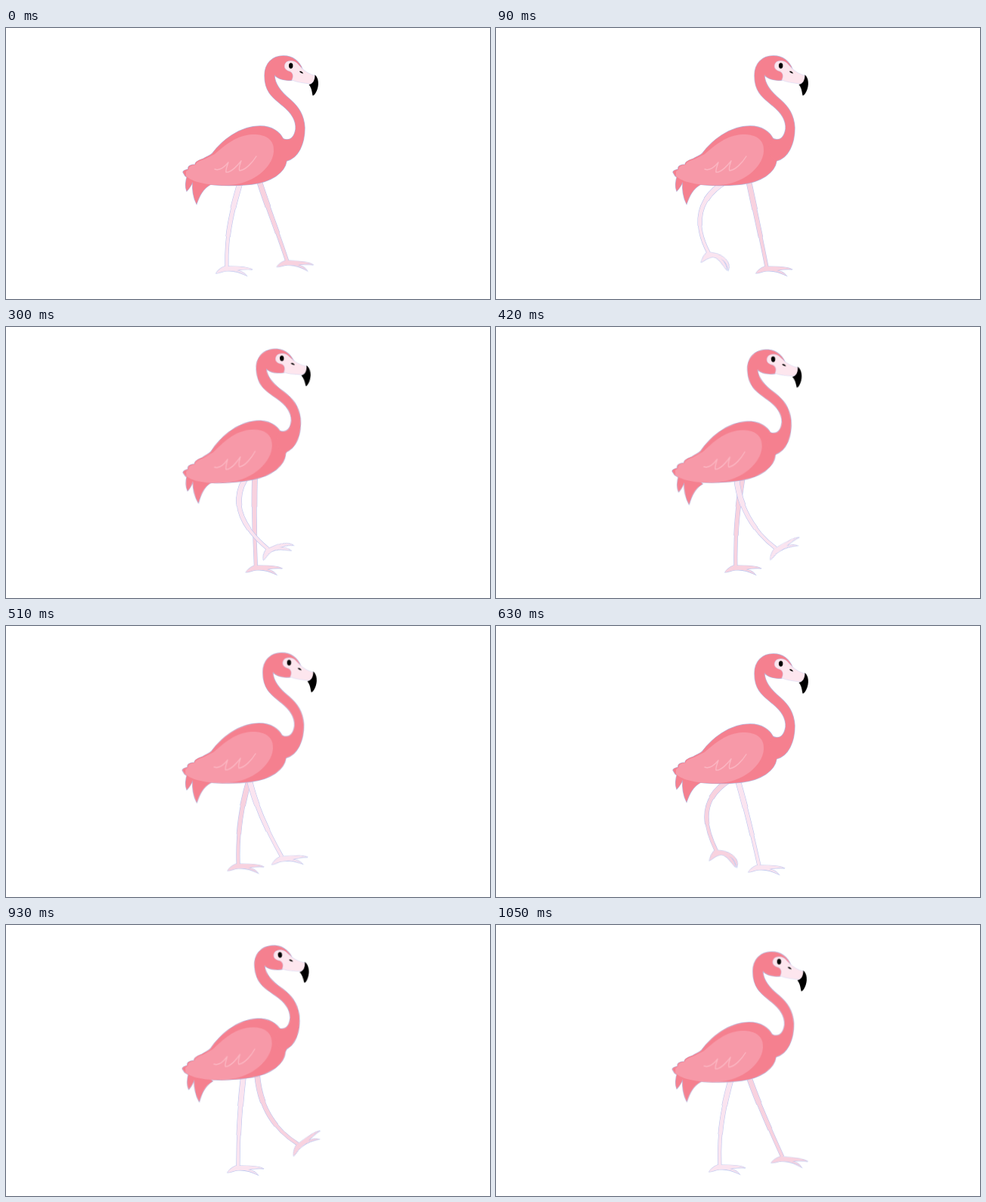
An HTML page without scripts for the animation above (1080 ms loop, 640 by 359 pixels).

```html
<!DOCTYPE html>
<html lang="en">
<head>
<meta charset="utf-8">
<title>Walking flamingo</title>
<style>
html, body { margin: 0; width: 100%; height: 100%; overflow: hidden; background: #fff; }
svg { display: block; width: 100%; height: 100%; }

.bird {
  --edge: #bcc6ee;
  --flat: path("M-3 0 C-8 2 -13 6 -14 9 C-9 9 -6 6 0 6 C10 5 18 8 26 12 C24 9 19 6 13 5 C20 4 28 3 34 4 C28 0 14 0 3 0Z");
  --curl: path("M-2 -1 C-6 4 -7 10 -7 14 C-4 12 0 6 7 4 C15 3 22 13 28 17 C27 12 22 6 17 4 C25 6 28 12 30 17 C32 8 22 -3 2 -1Z");
}

/* legs: three dashed strokes make the taper */
.far { --skin: #f8d2df; --walk: far-leg; --step: far-foot; }
.near { --skin: #fae4f0; --walk: near-leg; --step: near-foot; }
.leg path {
  fill: none; stroke: var(--skin); stroke-width: var(--w);
  animation: var(--walk) 1.08s linear infinite;
}
.leg.edge path { stroke: var(--edge); stroke-width: calc(var(--w) + 1.2px); }
.w1 { --w: 4px; }
.w2 { --w: 5.2px; stroke-dasharray: 6.6 20; }
.w3 { --w: 6.5px; stroke-dasharray: 3.4 20; }
.foot {
  d: var(--flat); fill: var(--skin);
  stroke: var(--edge); stroke-width: 1.2px; paint-order: stroke;
  animation: var(--step) 1.08s linear infinite;
}

.body { transform-origin: 310px 170px; animation: bob .54s linear infinite; }
.neck { transform-origin: 375px 165px; animation: reach .54s linear infinite; }
.tail { animation: sway .54s linear infinite; }
.pink { fill: #f5808f; }
.rim { fill: none; stroke: #b3b5dc; stroke-width: 1.3px; }

@keyframes bob {
  0%, 16.7%, 100% { transform: translate(0, 0) rotate(0deg); }
  33.3% { transform: translate(-1.2px, -2.5px) rotate(-5.2deg); }
  40% { transform: translate(-1.2px, -3px) rotate(-5.4deg); }
  72.2% { transform: translate(-2px, -4.5px) rotate(-3deg); }
  77.8% { transform: translate(-2px, -3.5px) rotate(-2.7deg); }
  94.4% { transform: translate(-1px, -.7px) rotate(-.7deg); }
}
@keyframes reach {
  0%, 16.7%, 94.4%, 100% { transform: translate(0, 0) rotate(0deg) scale(1, 1); }
  33.3%, 40% { transform: translate(0, 0) rotate(1.6deg) scale(1, .98); }
  72.2% { transform: translate(-2px, -3px) rotate(-2deg) scale(1, 1); }
  77.8% { transform: translate(-.5px, -1px) rotate(-1deg) scale(1, 1); }
}
@keyframes sway {
  0%, 16.7%, 100% { transform: translate(0, 0); }
  36% { transform: translate(-4px, -4px); }
  75% { transform: translate(2.5px, 3px); }
}

@keyframes near-leg {
  0%, 100% { d: path("M311 200 C303 230 291 264 292 317"); }
  8.33% { d: path("M306 202 C264 226 262 262 281 298"); }
  16.67% { d: path("M310 202 C258 228 264 265 300 297"); }
  23.6% { d: path("M314 202 C283 232 290 262 333 294"); }
  30.6% { d: path("M317 202 C308 232 324 266 355 294"); }
  38.9% { d: path("M318 200 C321 232 336 268 370 293"); }
  44.4% { d: path("M321 200 C326 235 342 268 370 302"); }
  50% { d: path("M321 200 C331 235 347 272 360 309"); }
  58.33% { d: path("M319 202 C328 232 338 272 348 317"); }
  69.44% { d: path("M318 200 C321 235 325 275 328 318"); }
  86.1% { d: path("M314 200 C310 235 307 275 307 319"); }
  97.2% { d: path("M312 200 C303 232 294 268 296 318"); }
}
@keyframes near-foot {
  0%, 100% { d: var(--flat); transform: translate(292px, 316px) rotate(0deg); }
  8.33% { d: var(--curl); transform: translate(281px, 298px) rotate(12deg); }
  16.67% { d: var(--curl); transform: translate(300px, 297px) rotate(0deg); }
  23.6% { d: var(--curl); transform: translate(333px, 294px) rotate(-20deg); }
  30.6% { d: var(--flat); transform: translate(355px, 294px) rotate(-26deg); }
  38.9% { d: var(--flat); transform: translate(370px, 293px) rotate(-32deg); }
  44.4% { d: var(--flat); transform: translate(370px, 302px) rotate(-14deg); }
  50% { d: var(--flat); transform: translate(360px, 309px) rotate(2deg); }
  58.33% { d: var(--flat); transform: translate(348px, 317px) rotate(0deg); }
  69.44% { d: var(--flat); transform: translate(329px, 318px) rotate(0deg); }
  86.1% { d: var(--flat); transform: translate(307px, 319px) rotate(0deg); }
  97.2% { d: var(--flat); transform: translate(296px, 318px) rotate(0deg); }
}
@keyframes far-leg {
  0%, 100% { d: path("M334 200 C344 232 360 272 372 309"); }
  8.33% { d: path("M334 202 C341 235 350 275 358 316"); }
  16.67% { d: path("M332 198 C336 235 341 275 344 317"); }
  38.9% { d: path("M326 198 C320 235 316 275 317 317"); }
  50% { d: path("M322 200 C310 232 302 268 304 316"); }
  58.33% { d: path("M312 202 C268 228 274 262 291 298"); }
  69.44% { d: path("M319 202 C288 232 292 262 338 293"); }
  77.8% { d: path("M327 202 C314 232 330 270 367 292"); }
  86.1% { d: path("M332 198 C335 235 350 268 386 290"); }
  91.7% { d: path("M333 198 C339 234 356 268 385 299"); }
  97.2% { d: path("M334 200 C345 232 362 270 379 307"); }
}
@keyframes far-foot {
  0%, 100% { d: var(--flat); transform: translate(373px, 308px) rotate(3deg); }
  8.33% { d: var(--flat); transform: translate(358px, 316px) rotate(0deg); }
  16.67% { d: var(--flat); transform: translate(346px, 316px) rotate(0deg); }
  38.9% { d: var(--flat); transform: translate(317px, 316px) rotate(0deg); }
  50% { d: var(--flat); transform: translate(304px, 315px) rotate(0deg); }
  58.33% { d: var(--curl); transform: translate(291px, 298px) rotate(9deg); }
  69.44% { d: var(--curl); transform: translate(339px, 292px) rotate(-18deg); }
  77.8% { d: var(--flat); transform: translate(367px, 292px) rotate(-29deg); }
  86.1% { d: var(--flat); transform: translate(386px, 290px) rotate(-38deg); }
  91.7% { d: var(--flat); transform: translate(385px, 299px) rotate(-15deg); }
  97.2% { d: var(--flat); transform: translate(379px, 307px) rotate(4deg); }
}
</style>
</head>
<body>
<svg viewBox="0 0 640 359" preserveAspectRatio="none">
  <defs>
    <path id="torso" d="M234 191C235 188 238 188 241 187C240 183 244 181 250 181C250 177 255 175 261 173C266 170 270 169 273 166C285 150 308 130 336 130C352 130 362 138 366 146C372 152 378 165 371 176C369 192 350 204 325 207C295 210 255 210 237 196Z"/>
    <path id="swan" d="M342 63C342 85 353 92 366 103C377 112 384 122 383 134C381 145 376 150 367 147C360 152 358 172 371 176C387 172 395 153 395 132C394 115 387 105 376 95C365 86 355 75 355 62C360 68 370 70 378 69L392 55C388 44 379 37 367 37C352 37 342 47 342 63Z"/>
    <path id="plume" d="M240 195C237 204 237 211 239 216C243 212 245 208 247 204C246 214 248 225 252 233C256 222 260 213 271 207L262 198Z"/>
  </defs>
  <g class="bird">
    <g class="far">
      <g class="leg edge"><path class="w1" pathLength="10"/><path class="w2" pathLength="10"/><path class="w3" pathLength="10"/></g>
      <path class="foot"/>
      <g class="leg"><path class="w1" pathLength="10"/><path class="w2" pathLength="10"/><path class="w3" pathLength="10"/></g>
    </g>
    <g class="near">
      <g class="leg edge"><path class="w1" pathLength="10"/><path class="w2" pathLength="10"/><path class="w3" pathLength="10"/></g>
      <path class="foot"/>
      <g class="leg"><path class="w1" pathLength="10"/><path class="w2" pathLength="10"/><path class="w3" pathLength="10"/></g>
    </g>
    <g class="body">
      <g class="rim">
        <use class="tail" href="#plume"/>
        <use href="#torso"/>
        <use class="neck" href="#swan"/>
      </g>
      <g class="pink">
        <use class="tail" href="#plume"/>
        <use href="#torso"/>
      </g>
      <path fill="#f799a8" d="M238 190L242 187C241 184 245 182 251 181C251 178 256 176 262 174L276 167C290 155 305 142 326 141C346 141 355 149 354 164C352 186 325 207 295 208C270 209 247 205 238 196Z"/>
      <path fill="none" stroke="#fbb5c1" stroke-width="1.4" stroke-linecap="round" stroke-linejoin="round" d="M276 187C283 190 289 184 294 178C292 184 290 189 291 191C298 192 306 182 311 176C309 182 307 187 309 189C317 188 326 178 331 170"/>
      <g class="neck">
        <use class="pink" href="#swan"/>
        <path fill="#fde6ee" stroke="#ccd2f2" stroke-width=".5" d="M370 46C374 42 383 43 387 49C393 56 402 62 409 63C410 69 408 72 402 74C394 73 385 72 378 69C381 63 379 58 374 57C368 55 367 50 370 46Z"/>
        <path d="M408.5 62C413.5 66 414.5 76 410.5 84C408.5 88 406.5 90 405.5 89.5C404.5 85 404.5 80 400.5 75C405.5 74 408.5 70 408.5 62Z"/>
        <ellipse cx="376.7" cy="50" rx="2.7" ry="3.7"/>
        <path d="M388 57.5C390 56.5 392.5 58 393 60.5C391 60 389 59.5 388 57.5Z"/>
      </g>
    </g>
  </g>
</svg>
</body>
</html>
```
